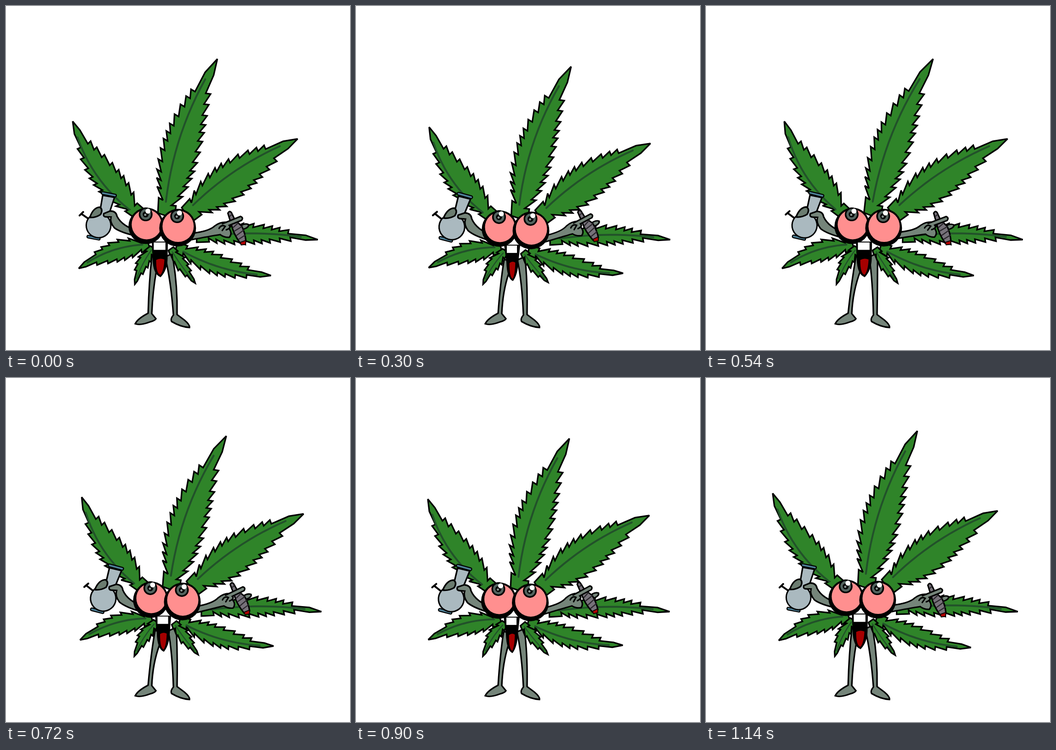
An HTML page with a canvas that plays this animation: 748 px wide and 748 px high, repeating every 1.2 s.

```html
<!DOCTYPE html>
<html>
<head>
<meta charset="utf-8">
<style>
html, body { margin: 0; width: 100%; height: 100%; overflow: hidden; background: #fff; }
canvas { display: block; width: 748px; height: 748px; }
</style>
</head>
<body>
<canvas id="stage" width="748" height="748"></canvas>
<script>
const ctx = document.getElementById('stage').getContext('2d');
const GREEN = '#2f8429', RIB = '#22512a', SKIN = '#75857a', GLASS = '#aab9bf', TEAL = '#4f8299';

let sway = 0, dip = 0; // both run from 0 to 1

// A point that slides sideways with the sway and is displaced by each dip.
const moving = (x, y, swayX, dipX, dipY) => () => [x + swayX * sway + dipX * dip, y + dipY * dip];

const body = moving(-1, -1, 14.5, 0, 7);
const mouth = moving(333.5, 520, 10, 0, 8);
const hips = () => [mouth()[0] - 334, mouth()[1] - 521];
const rim = moving(222.5, 408.5, 18, 5, 3);
const bowl = moving(200.5, 476.5, 14.5, 0, 4);
const butt = moving(487, 449, 14, -9, -3);
const tipOfRoll = moving(515.5, 518, 12, 0, -9);

// left and right are the widths on each side of the rib, seen from the base.
function leaf(x, y, root, tip, bend, left, right) {
  const [tx, ty] = tip(), size = Math.hypot(tx - x, ty - y);
  return { x, y, root, tip, bend, left, right, depth: 3 + size / 50, teeth: Math.round(size / 30 + 1) };
}

const lowLeaves = [
  leaf(415, 503, body, moving(677.5, 508, 12, -1, 0), 22, 22, 24),
  leaf(310, 518, hips, moving(158.5, 571, 8, -5, -2), -26, 28, 20),
  leaf(370, 525, hips, moving(575.5, 587, 7, 1.5, -6), -28, 28, 20),
  leaf(320, 525, hips, moving(281, 605, 4, -7, 0), -8, 14, 16),
  leaf(358, 528, hips, moving(410.5, 603, 6, 4, -2), -4, 16, 13)
];
const highLeaves = [
  leaf(285, 455, body, moving(143.6, 248.5, 28, 0, 15), 46, 18, 46),
  leaf(390, 450, body, moving(634, 287, 24, -7, 12), 33, 31, 54),
  leaf(345, 455, body, moving(459.7, 112, 38, -13, 20), 45, 34, 52)
];

const bongArm = new Path2D('M290 490Q253 481 241 458Q239 447 226 447L212 453Q210 461 219 460L228 460Q225 472 236 484Q250 494 285 501Z');
const thumb = new Path2D('M183 458Q190 440 203 439Q211 444 205 455Q195 462 183 462Z');
const neck = new Path2D('M209 413L235 417L224 452L203 452Z');
const stem = new Path2D('M182 467L164 455M159 458L167 450');
const jointArm = new Path2D('M400 494Q440 491 453 479Q468 469 484 473Q489 480 485 487Q492 498 484 506Q472 506 464 499Q440 502 400 508Z');
const roll = new Path2D('M483 452Q487 445 491 451L498 467L513 482Q520 498 521 516L508 520Q493 497 490 478Z');
const stripes = new Path2D('M487 459L493 454M494 484L506 474M497 492L513 483M501 502L517 491M505 511L520 502');
const ember = new Path2D('M508 518L521 514L520 523L510 524Z');
const fingers = new Path2D('M470 475L511 460Q518 463 513 469L485 479Q490 485 478 489M462 485Q468 476 476 481L469 490');
const longFinger = new Path2D('M505 485Q518 474 528 479Q530 486 512 490Z');

// Turns and scales the drawing so that points a,b land on p,q.
function pin(a, b, p, q) {
  const x = b[0] - a[0], y = b[1] - a[1], X = q[0] - p[0], Y = q[1] - p[1];
  const n = x * x + y * y, c = (X * x + Y * y) / n, s = (Y * x - X * y) / n;
  ctx.setTransform(c, s, -s, c, p[0] - c * a[0] + s * a[1], p[1] - s * a[0] - c * a[1]);
}

function line(path, width = 3.3, color = '#000') {
  ctx.lineWidth = width;
  ctx.strokeStyle = color;
  ctx.stroke(path);
}

function shape(path, fill, width) {
  ctx.fillStyle = fill;
  ctx.fill(path);
  line(path, width);
}

function disc(x, y, r, fill) {
  ctx.fillStyle = fill;
  ctx.beginPath();
  ctx.arc(x, y, r, 0, 2 * Math.PI);
  ctx.fill();
}

function bar(x1, y1, x2, y2) {
  const p = new Path2D(`M${x1} ${y1}L${x2} ${y2}`);
  line(p, 8);
  line(p, 3.5, TEAL);
}

function drawLeaf(l) {
  const [dx, dy] = l.root(), [tx, ty] = l.tip();
  const x = l.x + dx, y = l.y + dy, size = Math.hypot(tx - x, ty - y);
  const nx = (ty - y) / size, ny = (x - tx) / size;

  // Point at share u of the rib, moved out to the given side.
  const at = (u, offset) => {
    const out = offset + 2 * u * (1 - u) * l.bend;
    return [x + (tx - x) * u + nx * out, y + (ty - y) * u + ny * out];
  };
  const side = width => {
    const sign = Math.sign(width), points = [at(0, width * .45)];
    const reach = u => width * Math.sin(Math.PI * u ** .72);
    for (let i = 0; i < l.teeth; i++) {
      const u = .05 + .75 * (i + .5 + .15 * Math.sin(i * 5 + width)) / l.teeth;
      points.push(at(u + .006, reach(u)), at(u, reach(u) - sign * l.depth));
    }
    points.push(at(.9, reach(.9)));
    return points;
  };

  const edge = [...side(l.left), [tx, ty], ...side(-l.right).reverse()];
  shape(new Path2D('M' + edge.join(' ') + 'Z'), GREEN);
  const rib = [];
  for (let u = .08; u < .92; u += .06) rib.push(at(u, 0));
  line(new Path2D('M' + rib.join(' ')), size > 100 ? 4 : 2.5, RIB);
}

function drawLegs() {
  const [x, y] = hips();
  ctx.setTransform(1, 0, 0, 1, 0, 0);
  shape(new Path2D(`M${317 + x} ${545 + y}Q${311 + x * .6} 600 309 668Q286 680 281 691Q292 695 313 687Q324 684 326 680L317 669Q319 620 ${327 + x} ${575 + y}L${330 + x} ${545 + y}Z`), SKIN);
  shape(new Path2D(`M${346 + x} ${545 + y}Q${359 + x * .4} 600 364 672Q357 680 360 686Q380 698 399 699Q400 693 388 683L372 671Q373 610 ${364 + x} ${555 + y}L${358 + x} ${540 + y}Z`), SKIN);
}

function drawBong() {
  pin([201, 479], [223, 410], bowl(), rim());
  line(stem, 4);
  shape(neck, GLASS);
  bar(179, 504, 202, 508);
  disc(201, 479, 28.5, '#000');
  disc(201, 479, 25.5, GLASS);
  ctx.fillRect(207, 446, 15, 12);
  bar(209, 408, 236, 413);
  shape(bongArm, SKIN);
  shape(thumb, '#6b7c70');
}

function drawJoint() {
  pin([487, 450], [515, 521], butt(), tipOfRoll());
  shape(jointArm, SKIN);
  shape(longFinger, SKIN);
  shape(roll, '#77727a');
  line(stripes, 2.5, '#29262b');
  shape(ember, '#b00000', 2);
  shape(fingers, SKIN);
}

function drawEye(x, y, r) {
  disc(x - 1, y + 4, r + 6, '#000');
  disc(x, y, r + 4, '#000');
  disc(x, y, r, '#ff8f8f');
  const px = x - 2, py = y - 22;
  disc(px, py, 15, '#000');
  disc(px, py, 11.5, '#52645f');
  disc(px, py, 6.5, '#000');
  disc(px + 5, py - 7, 5.5, '#fff');
  disc(px - 1, py + 1, 2.5, '#87938f');
}

function drawMouth() {
  const [x, y] = mouth(), w = 24 - 8 * dip, bottom = 587 + 10 * dip;
  const h = w / 2 + 4, top = y + 29, tooth = w / 4 + 7;
  ctx.setTransform(1, 0, 0, 1, 0, 0);
  shape(new Path2D(`M${x - 16} ${y - 8}H${x + 17}L${x + h + 1} ${top}Q${x + h} ${bottom - 14} ${x + 2} ${bottom}Q${x - h + 2} ${bottom - 6} ${x - h + 1} ${top}Z`), '#000', 2);
  ctx.fillStyle = '#a50000';
  ctx.fill(new Path2D(`M${x - w * .33} ${top + 2}Q${x + 1} ${top - 3} ${x + w * .46} ${top + 1}Q${x + w * .42} ${bottom - 14} ${x + 2} ${bottom - 4}Q${x - w * .34} ${bottom - 6} ${x - w * .33} ${top + 2}Z`));
  ctx.fillStyle = '#fff';
  ctx.fillRect(x - tooth, y - 7, 2 * tooth, 16);
}

function draw(now) {
  const t = Math.floor(now % 1200 / 60) * 60 + 30;
  sway = 1 - Math.abs(t % 1200 - 600) / 600;
  dip = Math.abs(Math.sin(Math.PI * t / 600));
  ctx.setTransform(1, 0, 0, 1, 0, 0);
  ctx.fillStyle = '#fff';
  ctx.fillRect(0, 0, 748, 748);
  ctx.miterLimit = 3;
  ctx.lineCap = 'round';
  lowLeaves.forEach(drawLeaf);
  drawLegs();
  highLeaves.forEach(drawLeaf);
  drawBong();
  drawJoint();
  ctx.setTransform(1, 0, 0, 1, ...body());
  drawEye(306, 475, 32.5);
  drawEye(374.5, 479, 34);
  drawMouth();
}

const start = performance.now();
function loop() {
  draw(performance.now() - start);
  requestAnimationFrame(loop);
}
loop();
</script>
</body>
</html>
```
